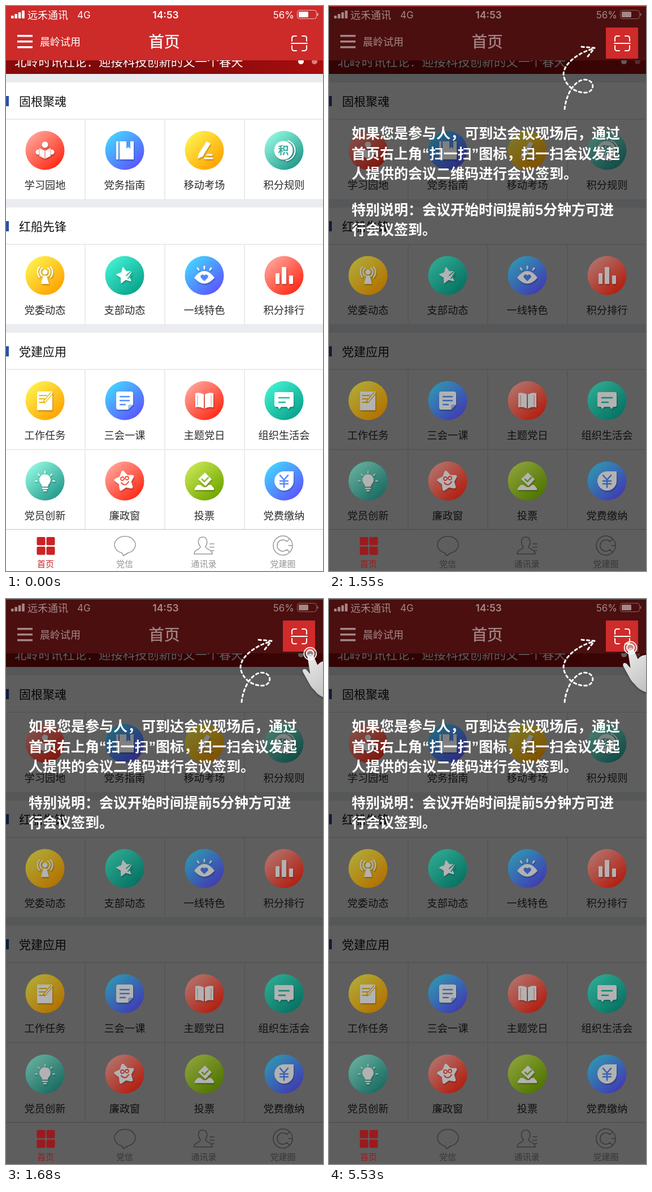
Animation of 561 by 998 pixels, one loop 8 s. Source, as an HTML page:

```html
<!DOCTYPE html>
<html lang="zh-CN">
<head>
<meta charset="utf-8">
<style>
html, body { margin: 0; width: 100%; height: 100%; overflow: hidden; background: #fff; }
svg { display: block; width: 561px; height: 998px; }
text { font-family: Inter, "Noto Sans CJK SC", "Noto Sans CJK", sans-serif; white-space: pre; }
#tip text { font-family: "Liberation Sans", "Noto Sans CJK SC", "Noto Sans CJK", sans-serif; font-weight: 600; }
.glyph { fill: #fff; stroke: none; filter: drop-shadow(1px 2px 1px #0004); }
.line { fill: none; stroke: #fff; stroke-linecap: round; stroke-linejoin: round; }
</style>
</head>
<body>
<svg id="stage" viewBox="0 0 561 998"></svg>
<script>
const RED = '#cd2a2a';
const DIM_AT = 1470, HAND_AT = 1610, STEP = 70, LOOP = 8000;

const rect = (x, y, w, h, fill, more = '') =>
  `<rect x="${x}" y="${y}" width="${w}" height="${h}" fill="${fill}" ${more}/>`;
const circle = (x, y, r, more = '') => `<circle cx="${x}" cy="${y}" r="${r}" ${more}/>`;
const path = (d, more = '') => `<path d="${d}" ${more}/>`;
const line = (d, width, color = '#fff') => path(d, `class="line" style="stroke:${color};stroke-width:${width}"`);
// Vertically centred on cy for CJK glyphs
const text = (s, x, cy, size, fill, more = '') =>
  `<text x="${x}" y="${cy + size * .38}" font-size="${size}" fill="${fill}" ${more}>${s}</text>`;
const mid = (s, x, cy, size, fill, more = '') =>
  text(s, x, cy, size, fill, 'text-anchor="middle" ' + more);

const star = (r, inner, turn) => 'M' + Array.from({ length: 10 }, (_, i) => {
  const a = (i * 36 - 90 + turn) * Math.PI / 180, q = i % 2 ? inner : r;
  return (q * Math.cos(a)).toFixed(1) + ' ' + (q * Math.sin(a)).toFixed(1);
}).join('L') + 'Z';

const colors = {
  red: ['#ffa196', '#ff2a16'], blue: ['#45d2ff', '#5c55ff'], yellow: ['#fdf04c', '#ffa200'],
  aqua: ['#8ff6de', '#24998c'], teal: ['#40f0cf', '#0aa28c'], green: ['#c6e550', '#70a600']
};

const glyphs = {
  reader: circle(0, -10, 5.5) +
    path('M0 1L-10 -4V10L0 15L10 10V-4Z') + circle(-12, 3, 4.5) + circle(12, 3, 4.5) +
    line('M0 2V14', 1.3, '#ff6a58') + line('M-10 -2V9M10 -2V9', 1, '#ff8a7c'),
  guide: rect(-15, -16, 4, 32, '#fff') + path('M-9 -16H16V16H-9Z') +
    path('M3 -16H10V-3L6.500 -6L3 -3Z', 'fill="#4c9dff"'),
  pencil: path('M4 -16L11 -12L-3 11L-12 15L-10 6Z') + line('M5 8H13M1 14H14', 3),
  points: circle(-1, 0, 16.5) + line('M7 -17A18 18 0 0 1 4 18', 2) +
    mid('积', -1, 0, 19, '#35ad9d', 'font-weight="700"'),
  tower: circle(0, -6, 4.5) + path('M-3 0H3L7 15H-7Z') +
    line('M-5 -13A8.500 8.500 0 0 0 -5 1M5 -13A8.500 8.500 0 0 1 5 1M-10 -15A14 14 0 0 0 -10 3M10 -15A14 14 0 0 1 10 3', 2.3),
  star: path(star(14, 7, -12), 'stroke="#fff" stroke-width="2" stroke-linejoin="round"') +
    line('M3 0L12 -8M6 5L13 -2', 2, '#1fbfa5'),
  eye: path('M-18 4Q0 -20 18 4Q0 25 -18 4Z') +
    path('M0 10L-6 4A3.500 3.500 0 0 1 0 0A3.500 3.500 0 0 1 6 4Z', 'fill="#5285ff"') +
    line('M0 -16V-12M-12 -13L-10 -10M12 -13L10 -10', 3),
  bars: rect(-15, -4, 7, 19, '#fff', 'rx="1"') + rect(-4, -15, 8, 30, '#fff', 'rx="1"') +
    rect(9, 0, 7, 15, '#fff', 'rx="1"'),
  task: rect(-14, -16, 27, 33, '#fff', 'rx="1"') +
    line('M-10 -9H3M-10 -3H0M-10 3H-2', 1.8, '#eeb500') +
    line('M11 -12L-1 2', 5, '#eeb500') + line('M12 -13L0 1', 2.5),
  notes: path('M-11 -16H11Q15 -16 15 -12V7L6 16H-11Q-15 16 -15 12V-12Q-15 -16 -11 -16Z') +
    line('M-8 -7H8M-8 0H8M-8 7H1', 2.4, '#5190ff') + path('M15 7H9Q6 7 6 10V16Z', 'fill="#a9c4ff"'),
  book: path('M-1 -11Q-8 -15 -16 -13V12Q-8 10 -1 14ZM1 -11Q8 -15 16 -13V12Q8 10 1 14Z') +
    line('M-12 -9V9M12 -9V9', 1, '#ff8377'),
  board: rect(-17, -15, 34, 26, '#fff', 'rx="3"') + path('M-11 11H-5L-8 15ZM5 11H11L8 15Z') +
    line('M-9 -5H9M-9 3H2', 2.6, '#1ebca3'),
  bulb: path('M-5 10Q-5 7 -8 4A10 10 0 1 1 8 4Q5 7 5 10Z') + line('M-4 13H4M-2 17H2', 2.5) +
    line('M0 -17V-14M-12 -12L-10 -10M12 -12L10 -10M-17 0H-14M17 0H14', 2),
  smile: path(star(16, 9, -12), 'stroke="#fff" stroke-width="5" stroke-linejoin="round"') +
    line('M-6 3Q1 11 7 1', 2, '#ff4d3c') +
    circle(-4, -4, 3, 'fill="none" stroke="#ff4d3c" stroke-width="1.800"') +
    circle(4, -5, 3, 'fill="none" stroke="#ff4d3c" stroke-width="1.800"'),
  vote: path('M1 -15L13 -3L2 9L-11 -3Z') + line('M-4 -3L0 1L7 -6', 2.6, '#92bf26') +
    path('M-12 7L-17 13H17L12 7H8L3 11H-1L-7 7Z') + rect(-17, 13, 34, 3, '#fff'),
  yen: path('M0 -17H17V0A17 17 0 1 1 0 -17Z') +
    line('M-7 -10L0 -2L7 -10M0 -2V11M-7 0H7M-7 5H7', 2.6, '#4e8cff')
};

const rows = [
  [255, [['学习园地', 'reader', 'red'], ['党务指南', 'guide', 'blue'], ['移动考场', 'pencil', 'yellow'], ['积分规则', 'points', 'aqua']]],
  [476, [['党委动态', 'tower', 'yellow'], ['支部动态', 'star', 'teal'], ['一线特色', 'eye', 'blue'], ['积分排行', 'bars', 'red']]],
  [697, [['工作任务', 'task', 'yellow'], ['三会一课', 'notes', 'blue'], ['主题党日', 'book', 'red'], ['组织生活会', 'board', 'teal']]],
  [839, [['党员创新', 'bulb', 'aqua'], ['廉政窗', 'smile', 'red'], ['投票', 'vote', 'green'], ['党费缴纳', 'yen', 'blue']]]
];

const defs = Object.entries(colors).map(([id, [a, b]]) =>
  `<linearGradient id="${id}" x1=".15" y1=".1" x2=".85" y2=".9"><stop stop-color="${a}"/><stop offset="1" stop-color="${b}"/></linearGradient>`).join('') +
  `<linearGradient id="banner"><stop stop-color="#8a0a0a"/><stop offset=".35" stop-color="#7a0909"/>
   <stop offset=".6" stop-color="#880a0a"/><stop offset="1" stop-color="#a80e0e"/></linearGradient>
   <linearGradient id="skin" x2=".6" y2="1"><stop stop-color="#eee"/><stop offset="1" stop-color="#b8b8b8"/></linearGradient>`;

const scan = line('M506 62V57Q506 53 510 53H514M524 53H528Q532 53 532 57V62M506 70V75Q506 79 510 79H514M524 79H528Q532 79 532 75V70M505 66H533', 2);

function page() {
  let s = rect(0, 0, 561, 998, '#fff') + rect(0, 96, 561, 24, 'url(#banner)') +
    text('北岭时讯社论：迎接科技创新的又一个春天', 15, 98, 21.3, '#fff') +
    circle(522, 98, 5, 'fill="#fff"') + circle(546, 98, 5, 'fill="#d78080"') +
    rect(0, 0, 561, 96, RED);
  [[120, '固根聚魂'], [341, '红船先锋'], [562, '党建应用']].forEach(([y, name], i) => {
    const title = 168 + i * 221;
    s += rect(0, y, 561, 15, '#ebecf0') + rect(0, title - 9, 5, 18, '#2b50a0') +
      text(name, 23, title, 21, '#111') + rect(0, title + 31, 561, 2, '#ebebed');
  });
  s += rect(0, 782.5, 561, 2, '#ebebed');
  for (const [y, cells] of rows) {
    for (const x of [139, 280, 421]) s += rect(x, y - 54, 2, 140, '#ebebed');
    cells.forEach(([name], i) => s += mid(name, 69 + i * 141, y + 61, 18.2, '#2a2a2a'));
  }
  s += rect(0, 924, 561, 74, '#fff') + rect(0, 924, 561, 1, '#c4c4c4');
  ['党信', '通讯录', '党建圈'].forEach((name, i) => s += mid(name, 210 + i * 140, 985, 15, '#959595'));
  const gray = d => line(d, 1.5, '#999');
  return s + gray('M205 966A18.500 15 0 1 1 216 966L208 971Z') +
    gray('M344 955C338 948 340 938 348 938S358 948 353 955C353 960 365 959 365 968H333C333 959 344 961 344 955Z') +
    gray('M361 950H368M361 956H368M364 962H368') +
    gray('M502 941A17 17 0 1 0 502 965L497 960A10 10 0 1 1 497 946ZM502 941A17 17 0 0 1 502 965M500 953H507');
}

function header() {
  let s = '';
  [5, 8, 11, 14].forEach((h, i) => s += rect(9 + i * 6.4, 22 - h, 4.6, h, '#fff', 'rx="1"'));
  s += text('远禾通讯', 38, 16, 18, '#fff') + text('4G', 126, 15.5, 17, '#fff') +
    mid('14:53', 282.5, 15.5, 17.5, '#fff', 'font-weight="600"') +
    text('56%', 510, 15.5, 17, '#fff', 'text-anchor="end"') +
    rect(515.5, 7.5, 34, 15, 'none', 'rx="4" stroke="#fff" stroke-opacity=".7"') +
    rect(518, 10, 17, 10, '#fff', 'rx="1.500"') + path('M551 12Q554 15 551 18Z', 'fill="#fff"');
  for (const y of [51, 61, 71]) s += rect(20, y, 27, 3.5, '#fff');
  return s + text('晨岭试用', 60, 63, 18, '#fff') +
    mid('首页', 280, 63, 27.5, '#fff', 'font-weight="500" stroke="#fff" stroke-width=".4"') + scan;
}

const icon = (kind, color, x, y) => `<g transform="translate(${x} ${y})">` +
  circle(0, 0, 34.5, `fill="url(#${color})"`) + `<g class="glyph">${glyphs[kind]}</g></g>`;

function home() {
  let s = mid('首页', 70, 985, 15, '#cd2226');
  for (const x of [54.5, 71.5]) for (const y of [938, 955]) s += rect(x, y, 15, 14.5, '#cd2226', 'rx="2"');
  return s;
}

const tipLines = [
  [224, '如果您是参与人，可到达会议现场后，通过'], [260, '首页右上角“扫一扫”图标，扫一扫会议发起'],
  [295, '人提供的会议二维码进行会议签到。'], [359, '特别说明：会议开始时间提前5分钟方可进'], [394.5, '行会议签到。']
];
const arrow = 'M417 182C419 160 432 132 452 130C472 130 471 153 453 153C432 153 416 137 415 120C416 101 442 82 469 75M447 72L470 74L458 89';

const hand = `<g style="filter:drop-shadow(1px 2px 2px #0006)">` +
  path('M-5 4Q0 -4 6 4L13 20Q19 13 26 13Q34 11 60 24V94L28 79Q14 74 8 65Q2 60 -2 52L-13 32Q-14 25 -7 28L0 36Z', 'fill="url(#skin)"') +
  '</g>' + circle(0, 0, 11, 'fill="#fff3" stroke="#fff" stroke-width="1.500"') +
  circle(0, 0, 6.5, 'fill="#bbb8" stroke="#fff" stroke-width="2"');

const group = (id, inner) => `<g id="${id}">${inner}</g>`;
stage.innerHTML = `<defs>${defs}</defs>` + page() +
  rect(0, 1, 561, 997, '#000', 'id="shade" opacity=".630"') + group('head', header()) +
  rows.map(([y, cells], r) =>
    group('row' + r, cells.map(([, kind, color], i) => icon(kind, color, 69 + i * 141, y)).join(''))).join('') +
  group('home', home()) +
  group('tip', rect(490, 38, 57, 55, '#cf2b2b') + scan +
    path(arrow, 'class="line" stroke-width="3" stroke-dasharray="4.500 5"') +
    tipLines.map(([y, s]) => text(s, 40, y, 25, '#fff')).join('')) +
  group('hand', hand);

const byId = id => document.getElementById(id);
const show = (id, on) => byId(id).style.display = on ? '' : 'none';
// How each bright group looks while the page is shaded
const shaded = {
  head: 'opacity(.5)', row0: 'brightness(.5)', row1: 'brightness(.7)',
  row2: 'brightness(.7)', row3: 'brightness(.7)', home: 'brightness(.75)'
};

function draw() {
  const t = performance.now() % LOOP, dim = t >= DIM_AT;
  show('shade', dim);
  show('tip', dim);
  show('hand', t >= HAND_AT);
  for (const id in shaded) byId(id).style.filter = dim ? shaded[id] : '';
  const left = Math.max(0, 3 - Math.floor((t - HAND_AT) / STEP));
  const away = left ** 3.4;
  byId('hand').setAttribute('transform', `translate(${533.5 + .45 * away} ${86 + away})`);
  requestAnimationFrame(draw);
}
draw();
</script>
</body>
</html>
```
